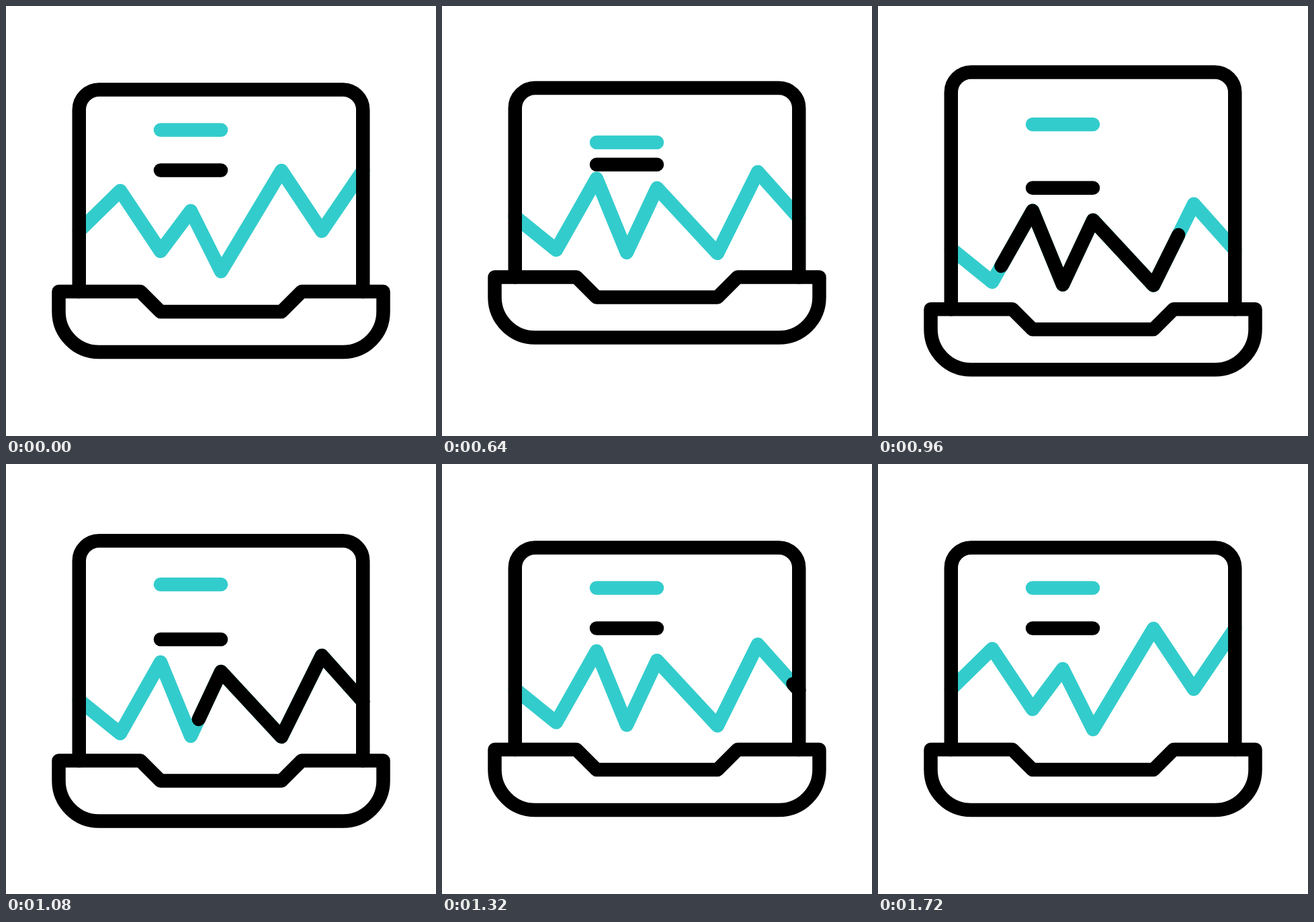
Write an HTML page with a canvas that moves like this. It is 640x640 px and loops after 2 s.

```html
<!DOCTYPE html>
<html lang="en">
<head>
<meta charset="utf-8">
<title>Laptop chart</title>
<style>
  html, body { margin: 0; width: 100%; height: 100%; overflow: hidden; background: #fff; }
  canvas { display: block; width: 640px; height: 640px; }
</style>
</head>
<body>
<canvas id="stage" width="640" height="640"></canvas>
<script>
const ctx = document.getElementById('stage').getContext('2d');
const LOOP = 2000, STEP = 40;
const TEAL = '#33cccc', BLACK = '#000';
const LEFT = 108.75, RIGHT = 531.25;

// Chart corners: x, height in the first shape, height in the second shape.
const corners = [
  [LEFT, 335, 335], [170, 275, 384.5], [230, 365, 278.5], [275, 305, 388.5],
  [320, 395, 292.5], [410, 245, 389.5], [470, 335, 268.5], [RIGHT, 245, 337]
];

const mix = (a, b, u) => a + (b - a) * u;

function ease(t, from, to) {
  const u = Math.min(1, Math.max(0, (t - from) / (to - from)));
  return u * u * (3 - 2 * u);
}

// Squash and hold, pop past the rest position, then settle back to zero.
function bounce(t, low, high, squashEnd, popStart, settleEnd) {
  const squashed = low * ease(t, 120, squashEnd);
  const popped = mix(squashed, high, ease(t, popStart, 960));
  return popped * (1 - ease(t, 960, settleEnd));
}

function stroke(color, path) {
  ctx.strokeStyle = color;
  ctx.stroke(path);
}

function bar(color, y) {
  stroke(color, new Path2D(`M230 ${y}H320`));
}

function chart(t, shift) {
  const morph = ease(t, 120, 640) - ease(t, 1360, 1720);
  const points = corners.map(([x, a, b]) => [x, mix(a, b, morph) + shift]);
  const line = new Path2D();
  let length = 0;
  points.forEach(([x, y], i) => {
    line.lineTo(x, y);
    if (i) length += Math.hypot(x - points[i - 1][0], y - points[i - 1][1]);
  });
  stroke(TEAL, line);

  const head = ease(t, 640, 1080), tail = ease(t, 840, 1360);
  if (head <= tail) return;
  ctx.setLineDash([(head - tail) * length, length * 2]);
  ctx.lineDashOffset = -tail * length;
  stroke(BLACK, line);
  ctx.setLineDash([]);
}

function laptop(top, y) {
  stroke(BLACK, new Path2D(
    `M${LEFT} ${y}V${top + 30}a30 30 0 0 1 30 -30H${RIGHT - 30}a30 30 0 0 1 30 30V${y}`));
  stroke(BLACK, new Path2D(
    `M78.5 ${y}H200l30 30H410l30 -30H561.5v30a60 60 0 0 1 -60 60H138.5a60 60 0 0 1 -60 -60Z`));
}

function draw(t) {
  const base = bounce(t, -21.5, 26.25, 280, 840, 1250);
  const lid = bounce(t, -2.6, -26, 280, 857, 1170);
  const upperBar = bounce(t, 40, -34.5, 480, 843, 1250);
  const lowerBar = 13 * (ease(t, 320, 480) - ease(t, 680, 880));

  ctx.fillStyle = '#fff';
  ctx.fillRect(0, 0, 640, 640);
  ctx.lineWidth = 20.5;
  ctx.lineCap = ctx.lineJoin = 'round';
  chart(t, base);
  bar(TEAL, 184.5 + base + upperBar);
  bar(BLACK, 244.5 + base + lowerBar);
  laptop(124.5 + lid, 425 + base);
}

const start = performance.now();
function tick() {
  const t = (performance.now() - start) % LOOP;
  draw(Math.floor(t / STEP) * STEP);
  requestAnimationFrame(tick);
}
tick();
</script>
</body>
</html>
```
